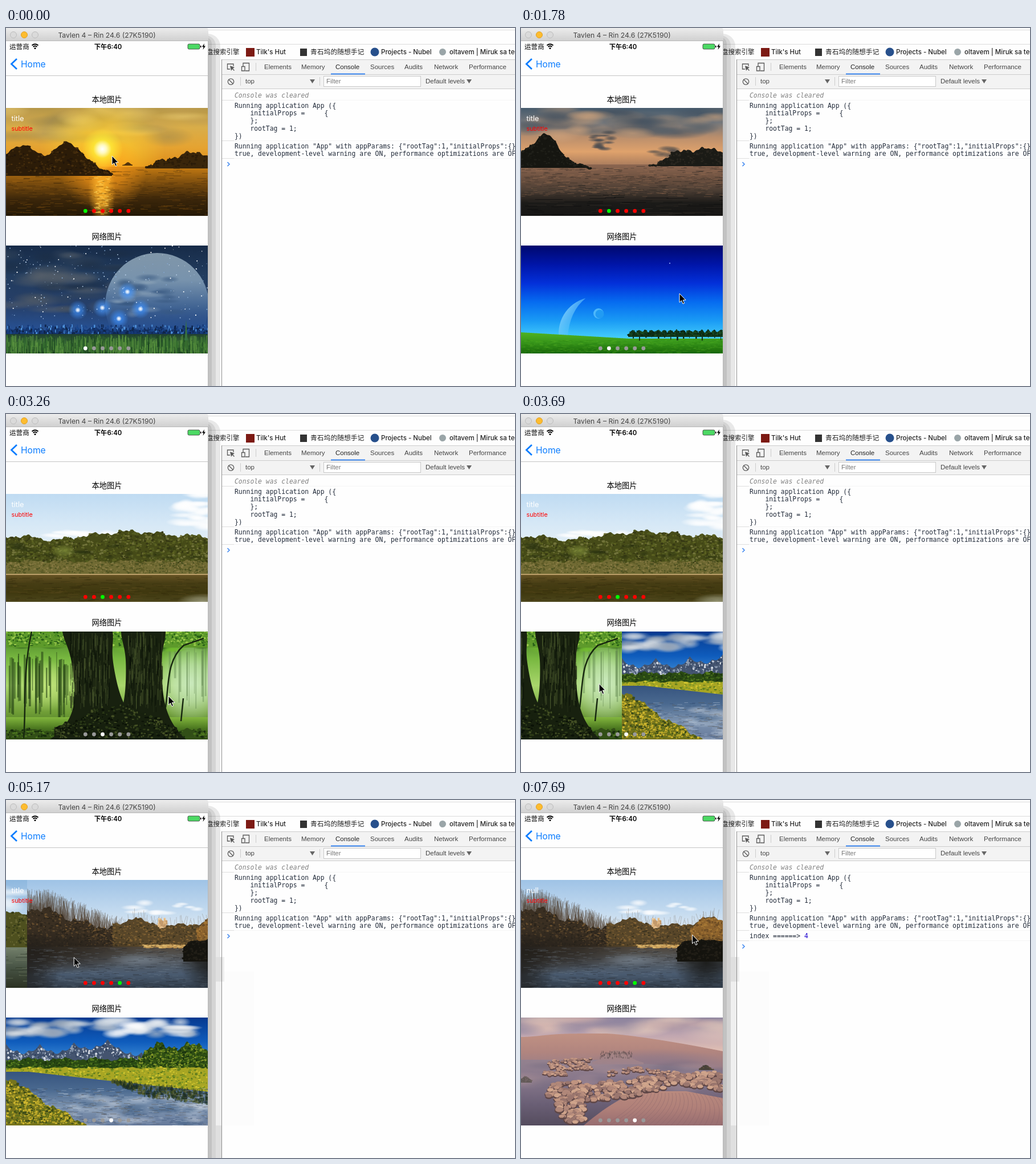
Write an HTML page with a canvas that moves like this. It is 893 px wide and 627 px high and loops after 8000 ms.

```html
<!DOCTYPE html>
<html lang="zh">
<head>
<meta charset="utf-8">
<title>Carousel demo</title>
<style>
html, body { margin: 0; width: 100%; height: 100%; overflow: hidden; background: #fff; }
svg, .carousel { position: absolute; left: 0; top: 0; }
.carousel { width: 354px; height: 189px; overflow: hidden; }
.strip { display: flex; width: 1770px; }
canvas { flex: none; display: block; }
text { white-space: pre; }
.ui { font-family: Inter, "Noto Sans CJK SC", "Noto Sans CJK", sans-serif; }
.tab { font: 11.5px "Liberation Sans", sans-serif; fill: #444; }
.mono { font: 11.38px "DejaVu Sans Mono", monospace; fill: #222b3a; }
.mid { text-anchor: middle; }
</style>
</head>
<body>
<svg width="893" height="627">
  <defs>
    <linearGradient id="bar" x2="0" y2="1"><stop stop-color="#ececec"/><stop offset="1" stop-color="#cfcfcf"/></linearGradient>
  </defs>
  <rect width="893" height="627" fill="#fefefe"/>
  <path d="M354 3.5H893M354 28.5H893" stroke="#dcdcdc"/>

  <g class="ui" font-size="11.5" font-weight="500" fill="#222">
    <text x="352" y="46">盘搜索引擎</text>
    <rect x="421" y="35" width="15" height="15" fill="#7d1a14"/>
    <text x="439" y="46">Tilk's Hut</text>
    <rect x="516" y="36" width="12" height="13" fill="#333"/>
    <text x="534" y="46" font-size="11.8">青石坞的随想手记</text>
    <circle cx="647" cy="42" r="7.5" fill="#27508c"/>
    <text x="658" y="46">Projects - Nubel</text>
    <circle cx="766" cy="42" r="6" fill="#9aa5a8"/>
    <text x="778" y="46">oltavem | Miruk sa te</text>
  </g>

  <rect x="379" y="55" width="514" height="52" fill="#f3f3f3"/>
  <path d="M379 55.5H893M379 81.5H893M379 106.5H893" stroke="#ccc"/>
  <path d="M438.5 61V75M411.5 86V101M550.5 86V101" stroke="#ccc"/>
  <g fill="none" stroke="#5a5a5a" stroke-width="1.3">
    <path d="M393 72H388.5V63H399V67"/>
    <path d="M393 66l2 9 2-3 3 3 1-1-3-3 3-2z" fill="#5a5a5a" stroke="none"/>
    <path d="M416 67V61.5H426.5V75H420M413.5 67.5H419V75H413.5Z"/>
    <circle cx="394.5" cy="94" r="5.2"/><path d="M391 90.5l7 7"/>
  </g>
  <g class="tab">
    <text x="453" y="72">Elements</text><text x="518" y="72">Memory</text>
    <text x="578" y="72" fill="#222">Console</text><text x="639" y="72">Sources</text>
    <text x="699" y="72">Audits</text><text x="751" y="72">Network</text>
    <text x="812" y="72">Performance</text>
    <rect x="557.5" y="84.5" width="170" height="18" fill="#fff" stroke="#c8c8c8"/>
    <text x="420" y="97">top</text><text x="562" y="97" style="fill:#777">Filter</text>
    <text x="736" y="97">Default levels</text>
    <path d="M533 90h9l-4.5 7zM808 90h9l-4.5 7z" fill="#666"/>
  </g>
  <path d="M570 80.5H630" stroke="#3b86f0" stroke-width="2"/>

  <path d="M400 126.5H893M400 197.5H893M400 228.5H893" stroke="#f5f5f5"/>
  <path d="M379 126.5H400M379 197.5H400M379 228.5H400" stroke="#dedede"/>
  <g class="mono">
    <text x="401" y="122" font-style="italic" style="fill:#808080">Console was cleared</text>
    <text x="401" y="140">Running application App ({</text>
    <text x="401" y="153">    initialProps =     {</text>
    <text x="401" y="166">    };</text>
    <text x="401" y="180">    rootTag = 1;</text>
    <text x="401" y="193">})</text>
    <text x="401" y="211">Running application "App" with appParams: {"rootTag":1,"initialProps":{}</text>
    <text x="401" y="224">true, development-level warning are ON, performance optimizations are OF</text>
    <g id="log">
      <path d="M379 246.5H400" stroke="#dedede"/><path d="M400 246.5H893" stroke="#f5f5f5"/>
      <text x="401" y="242">index ======&gt; <tspan fill="#1c00cf">4</tspan></text>
    </g>
  </g>
  <path id="prompt" d="M388.5 235l3.5 3.5-3.5 3.5" fill="none" stroke="#3b86f0" stroke-width="1.5"/>

  <g fill="#000" fill-opacity=".085">
    <rect x="-20" y="10" width="396" height="660" rx="22"/>
    <rect x="-20" y="13" width="388" height="660" rx="18"/>
    <rect x="-20" y="16" width="381" height="660" rx="12"/>
  </g>
  <path d="M378.5 55V627" stroke="#8e8e8e"/>
  <g id="ghost">
    <path d="M383 300H435V570H383z" fill="#fcfcfc"/>
    <path d="M379 275H383V318H379z" fill="#eee"/>
    <path d="M368 275H378V318H368zM368 570H378V627H368z" fill="#dfdfdf"/>
    <path d="M368 318H378V570H368z" fill="#efefef"/>
  </g>

  <path d="M0 22H355V627H0z" fill="#fefefe"/>
  <path d="M0 0H351Q355 0 355 4V23H0z" fill="url(#bar)"/>
  <path d="M0 22.5H355M354.5 22V627" stroke="#b8b8b8"/>
  <g fill="#dadada" stroke="#bdbdbd">
    <circle cx="13" cy="12" r="5.5"/><circle cx="51" cy="12" r="5.5"/>
    <circle cx="32" cy="12" r="5.5" fill="#fdbc2f" stroke="#e0a024"/>
  </g>
  <g class="ui">
    <text class="mid" x="177" y="17" font-size="12.2" fill="#444">Tavlen 4 – Rin 24.6 (27K5190)</text>
    <text x="6" y="36.5" font-size="11.6">运营商</text>
    <text class="mid" x="179" y="36.5" font-size="11.3" font-weight="600">下午6:40</text>
    <text x="26" y="68.5" font-size="15.6" fill="#0a7cff">Home</text>
    <text class="mid" x="177" y="129.5" font-size="13.3">本地图片</text>
    <text class="mid" x="177" y="370" font-size="13.3">网络图片</text>
  </g>
  <g fill="none" stroke="#000" stroke-width="1.8">
    <path d="M45.5 30.5q5.5-4.5 11 0M47.5 33q3.5-3 7 0"/><circle cx="51" cy="35.5" r=".7"/>
  </g>
  <rect x="319" y="28" width="21" height="9" rx="2" fill="#4cd964" stroke="#333" stroke-width=".8"/>
  <path d="M341 31h1.5v3H341zM348 27l-4 6h2.500l-1 5 4.500-6.500h-2.700z"/>
  <path d="M19 54l-9.500 9 9.500 9" fill="none" stroke="#0a7cff" stroke-width="2.8"/>
  <path d="M0 83.5H354" stroke="#c4c4c4"/>
</svg>

<div class="carousel" style="top:140px"><div class="strip" id="local"></div></div>
<div class="carousel" style="top:381px"><div class="strip" id="remote"></div></div>

<svg width="893" height="627">
  <text class="ui" id="caption" x="9.5" y="163" font-size="12.8" fill="#fff">title</text>
  <text class="ui" x="9.5" y="180" font-size="10.8" fill="red">subtitle</text>
  <g id="localDots"></g><g id="remoteDots"></g>
  <path id="cursor" d="M0 0V15.5L3.6 12.3 6 18 8.6 17 6.2 11.4H11Z" stroke="#fff"/>
</svg>

<script>
const $ = id => document.getElementById(id);
const W = 354, H = 189;
let g, seed;

const clamp = u => Math.min(1, Math.max(0, u));
const ramp = (x, a, b) => clamp((x - a) / (b - a));
const bump = (x, center, width) => Math.exp(-(((x - center) / width) ** 2));
const rough = (x, amp) => amp * (Math.sin(x / 9) + .6 * Math.sin(x / 3.7 + 1) + .4 * Math.sin(x / 1.7));
const value = (v, x) => typeof v === 'function' ? v(x) : v;
const rnd = (a, b) => {
  seed = seed * 16807 % 2147483647;
  return a + (b - a) * seed / 2147483647;
};
const pick = list => list[Math.floor(rnd(0, list.length))];
const times = (n, draw) => { for (let i = 0; i < n; i++) draw(i); };

function vertical(y0, y1, colors) {
  const grad = g.createLinearGradient(0, y0, 0, y1);
  colors.forEach((c, i) => grad.addColorStop(i / (colors.length - 1), c));
  return grad;
}
function fade(y0, y1, ...colors) {
  g.fillStyle = vertical(y0, y1, colors);
  g.fillRect(0, y0, W, y1 - y0);
}
function land(color, x0, x1, top, base = H) {
  g.fillStyle = color;
  g.beginPath();
  g.moveTo(x0, base);
  for (let x = x0; x <= x1; x++) g.lineTo(x, value(top, x));
  g.lineTo(x1, base);
  g.fill();
}
function disc(color, x, y, rx, ry = rx) {
  g.fillStyle = color;
  g.beginPath();
  g.ellipse(x, y, rx, ry, 0, 0, 7);
  g.fill();
}
function glow(color, x, y, rx, ry = rx, alpha = 1) {
  g.save();
  g.translate(x, y);
  g.scale(1, ry / rx);
  g.globalAlpha = alpha;
  const grad = g.createRadialGradient(0, 0, 0, 0, 0, rx);
  grad.addColorStop(0, color);
  grad.addColorStop(.45, color + 'b0');
  grad.addColorStop(1, color + '00');
  disc(grad, 0, 0, rx);
  g.restore();
}
function clouds(n, colors, x0, x1, y0, y1, size, alpha) {
  times(n, () => glow(pick(colors), rnd(x0, x1), rnd(y0, y1), rnd(.4, 1) * size, rnd(.12, .28) * size, alpha));
}
function bars(n, colors, x0, x1, y0, y1, w, h) {
  times(n, () => {
    g.fillStyle = pick(colors);
    g.fillRect(rnd(x0, x1), rnd(y0, y1), rnd(.3, 1) * w, rnd(.5, 1) * h);
  });
}
// Speckled foliage between a skyline and a base line.
function mass(n, colors, x0, x1, top, base, r) {
  land(colors[0], x0, x1, top, base);
  times(n, () => {
    const x = rnd(x0, x1), y = value(top, x);
    disc(pick(colors), x, rnd(y, Math.max(y, base - r)), rnd(.3, 1) * r, rnd(.25, .7) * r);
  });
}
function twigs(n, color, x0, x1, top, base) {
  g.strokeStyle = color;
  g.lineWidth = .5;
  g.beginPath();
  times(n, () => {
    const x = rnd(x0, x1), y = value(top, x) + rnd(-5, 30);
    g.moveTo(x, base);
    g.quadraticCurveTo(x + rnd(-3, 3), (y + base) / 2, x + rnd(-9, 9), y);
  });
  g.stroke();
}
function stones(n, x0, x1, top, depth, r) {
  times(n, i => {
    const x = rnd(x0, x1), y = top(x) + value(depth, x) * i / n, w = rnd(.6, 1) * r;
    disc('#5f4747', x, y + 1.5, w, w * .65);
    disc(pick(['#d0a58c', '#c09480', '#b1887a', '#9a766e']), x, y, w * .85, w * .5);
  });
}
function trunk(center, lean, half, flare) {
  const edge = (y, side) => center + lean * y / H + side * (half + 8 * bump(y, 0, 30) + flare * (y / H) ** 5);
  g.fillStyle = '#18210f';
  g.beginPath();
  for (let y = 0; y <= H; y++) g.lineTo(edge(y, -1), y);
  for (let y = H; y >= 0; y--) g.lineTo(edge(y, 1), y);
  g.fill();
  bars(220, ['#39452488', '#0b1208aa', '#4d5c3088'], center - half + 4, center + half + 2, 0, 115, 2, 30);
}

const localPhotos = [
  function sunset() {
    fade(0, 104, '#b49648', '#d9ad49', '#e5a331', '#dd8a17');
    clouds(30, ['#9a864d', '#eed077', '#c4a052'], 0, W, 0, 55, 70, .5);
    glow('#ffd02c', 169, 72, 110, 85, .8);
    fade(103, H, '#c77c12', '#7a4c0e', '#3b260a', '#241806');
    glow('#ff9c18', 172, 115, 75, 65, .8);
    glow('#ffb52c', 168, 145, 24, 60, .9);
    bars(500, ['#2d1c0877', '#a96a1666'], 0, W, 106, H, 18, 1);
    bars(120, ['#ffd65a', '#ffb42d'], 154, 180, 106, 186, 9, 1);
    glow('#fff43a', 169, 72, 36);
    glow('#ffffff', 169, 72, 16);
    mass(350, ['#2c1c08', '#3b270c', '#21150a', '#4a300e'], 0, 186,
      x => 112 - 46 * bump(x, 25, 42) - 50 * bump(x, 110, 38) + rough(x, 2), 119, 3);
    mass(160, ['#3a260b', '#2b1c09'], 246, W, x => 103 - 23 * ramp(x, 246, 310) + rough(x, 3), 106, 3);
    land('#54350d', 204, 222, x => 100 - 5 * bump(x, 214, 5), 101);
  },
  function dusk() {
    fade(0, 102, '#465b6d', '#74777b', '#b98e6c', '#dfa26c', '#a77a5c');
    clouds(40, ['#3e4d5d', '#59626a', '#d4a67d'], 0, W, 0, 50, 60, .6);
    clouds(14, ['#46494e'], 125, 158, 42, 72, 18, .8);
    clouds(6, ['#55504d'], 230, 270, 70, 85, 26, .8);
    fade(99, H, '#8c6650', '#6e5241', '#4c3e34', '#1b1a18', '#171615');
    bars(600, ['#a7795866', '#2e282399'], 0, W, 102, 155, 15, 1);
    bars(90, ['#2c2824', '#0f0f0f'], 0, W, 150, H, 50, 1);
    mass(260, ['#161611', '#20201a'], 0, 122,
      x => 103 - 55 * bump(x, 45, 32) - 20 * bump(x, 0, 25) + rough(x, 2), 105, 3);
    mass(200, ['#1b1b16', '#29261f'], 226, W, x => 101 - 28 * ramp(x, 226, 285) + rough(x, 3), 102, 3);
  },
  function greenLake() {
    const skyline = x => 74 + 7 * bump(x, 85, 35) - 8 * bump(x, 220, 65) + rough(x, 2.4);
    fade(0, 95, '#bfdbf2', '#d4e7f6', '#e6f0f6');
    clouds(26, ['#ffffff'], 305, 365, 0, 60, 34, .8);
    clouds(16, ['#ffffff'], 60, 235, 66, 76, 26, .9);
    mass(1700, ['#464b18', '#5c6222', '#373a14', '#71733a', '#525a20'], 0, W, skyline, 140, 3.2);
    clouds(22, ['#28300f'], 0, W, 85, 112, 20, .6);
    glow('#81903b', 101, 100, 22, 12, .7);
    mass(900, ['#716b34', '#5c5a26', '#887b45', '#4e5222'], 0, W, x => 118 + rough(x, 2), 141, 2.5);
    fade(140, H, '#6b5626', '#463d14', '#3f380f', '#4b451b');
    bars(1, ['#c9ab75'], 0, 0, 140, 140, 2000, 2.5);
    bars(260, ['#5d4d1e66', '#302a0b66'], 0, W, 145, H, 20, 1.5);
    glow('#a2a385', 345, 188, 45, 14, .8);
  },
  function valley() {
    fade(0, 105, '#8eb8df', '#dbe8f2');
    clouds(12, ['#ffffff'], 0, W, 10, 65, 60, .6);
    mass(900, ['#4e501f', '#696833', '#353a17'], 0, W, x => 58 + 25 * bump(x, 160, 70) + rough(x, 2), 120, 3);
    fade(118, H, '#73806b', '#475344', '#2b3122');
    bars(180, ['#8e997a77', '#29312388'], 0, W, 120, H, 30, 1.3);
  },
  function autumnLake() {
    const grove = x => 20 + 52 * ramp(x, 30, 165);
    const farTrees = x => 79 - 14 * bump(x, 190, 18) - 13 * bump(x, 335, 28) + rough(x, 2);
    fade(0, 110, '#9fc3e6', '#c3daef', '#eef1f3');
    clouds(12, ['#ffffff'], 170, 300, 40, 62, 24, .8);
    twigs(800, '#4a3b2a99', 0, 160, grove, 112);
    mass(800, ['#3a2f22', '#4b3b28', '#29231a', '#6b5130', '#2f281e'], 0, 165, x => grove(x) + 30 - 14 * ramp(x, 90, 165) + rough(x, 4), 120, 2.6);
    twigs(160, '#66533c88', 155, W, x => farTrees(x) - 12, 112);
    mass(700, ['#584629', '#70572f', '#3f3520', '#856435'], 150, W, farTrees, 118, 2.6);
    bars(24, ['#dfb681', '#c39a6c', '#edca9b'], 229, 242, 66, 78, 6, 9);
    mass(260, ['#8c622d', '#a47735', '#6c4c25'], 298, W, x => 68 + 14 * (1 - ramp(x, 298, 320)) + rough(x, 2), 109, 3);
    fade(117, H, '#4f463b', '#555a60', '#4a5b70', '#323d4a');
    glow('#26211b', 20, 125, 190, 42, .95);
    glow('#1e1c19', 0, 160, 60, 70, .8);
    glow('#8594a3', 195, 140, 55, 12, .5);
    bars(600, ['#7d8b9955', '#25282c77'], 0, W, 119, H, 15, 1);
    bars(120, ['#bd9251', '#dab66d'], 202, 277, 113, 118, 10, 2);
    glow('#171715', 325, 145, 58, 50, .9);
    mass(260, ['#15140f', '#211e17'], 274, W, x => 106 + 14 * bump(x, 272, 9) + rough(x, 1), 143, 3);
  },
];

const remotePhotos = [
  function nightPlanet() {
    fade(0, 156, '#172b48', '#223c5e', '#263f69', '#27549b');
    clouds(38, ['#59616a', '#35465a', '#1b2c42'], 0, 220, 10, 115, 55, .55);
    disc(vertical(13, 155, ['#8096a9', '#7893ad', '#416493', '#27519700']), 265, 104, 91);
    clouds(16, ['#37577f'], 205, 300, 55, 120, 30, .6);
    clouds(10, ['#b3c3cc'], 190, 260, 60, 120, 28, .3);
    times(260, () => disc(pick(['#ffffff', '#b8cfea', '#86aad5']), rnd(0, W), rnd(0, 130), rnd(.3, 1.1)));
    for (const [x, y] of [[126, 113], [169, 109], [213, 81], [236, 111], [198, 128]]) {
      glow('#3f93ff', x, y, 17, 17, .8);
      glow('#ffffff', x, y, 5);
    }
    mass(300, ['#14346c', '#1c4689', '#102447'], 0, W, x => 146 + rough(x, 2), 157, 3);
    bars(330, ['#4d8fd8', '#1a478d', '#10264d', '#173a78'], 0, W, 138, 152, 3, 6);
    fade(155, H, '#203f31', '#386934', '#244c23');
    times(900, () => {
      const x = rnd(0, W);
      land(pick(['#316a2d99', '#4d863999', '#1c442299', '#619a4499']), x, x + 2, rnd(156, 180), rnd(176, 195));
    });
    land('#377141', 313, 319, x => 166 - 36 * bump(x, 316, 1.5), 166);
  },
  function blueMeadow() {
    const meadow = x => 152 + 11 * ramp(x, 0, 190);
    fade(0, 165, '#00086d', '#0015a8', '#0330d9', '#066cf0', '#1a9bf5', '#49d2fc');
    const ring = g.createLinearGradient(70, 105, 125, 140);
    ring.addColorStop(0, '#8ad4fd');
    ring.addColorStop(1, '#42baf700');
    g.fillStyle = ring;
    g.beginPath();
    g.arc(130, 154, 64, 2.8, 4.45);
    g.quadraticCurveTo(85, 115, 82, 160);
    g.fill();
    disc('#4db8fb', 136, 119, 9);
    disc('#219bf3', 138, 120, 7.5);
    disc('#9bbcff', 261, 31, 1);
    land(vertical(152, H, ['#4fb322', '#37951a', '#176508']), 0, W, meadow);
    bars(700, ['#61bb2855', '#23750c55'], 0, W, 165, H, 9, 1);
    for (let x = 196; x < W + 6; x += 11) {
      bars(1, ['#112c16'], x, x, 152, 152, 3, 15);
      mass(35, ['#10351b', '#1c4c23', '#0b2715'], x - 8, x + 8, u => 157 - 9 * bump(u, x, 6), 160, 2.5);
    }
  },
  function forest() {
    fade(0, H, '#437b23', '#78b840', '#a9d66c', '#6f9d36', '#315f19');
    glow('#cdebc5', 325, 90, 65, 75, .9);
    glow('#c6e77c', 70, 95, 55, 45, .7);
    bars(45, ['#213d1399', '#34571d99'], 0, 115, 35, 65, 4, 100);
    bars(13, ['#5a814a66'], 285, W, 15, 40, 4, 105);
    clouds(50, ['#72bc2e', '#356d19', '#1c4913'], 0, W, 0, 32, 35, .8);
    mass(900, ['#5e9a2b', '#4b8c22', '#9ac94b', '#285f18'], 0, W, 0, 28, 3);
    fade(150, H, '#82b63d', '#4c7820', '#203d10');
    mass(400, ['#324f17', '#182e0d', '#4c761f'], 0, W, x => 172 + rough(x, 2), H, 3);
    trunk(143, 30, 36, 60);
    trunk(241, 2, 31, 42);
    mass(550, ['#17200e', '#2b3917', '#0b1207', '#434f24'], 85, 300, x => 178 - 50 * bump(x, 195, 85) + rough(x, 2), H, 3);
    g.strokeStyle = '#17280f';
    g.lineWidth = 2.5;
    g.stroke(new Path2D('M280 133C286 90 282 50 312 24L347 12M307 157L311 117M31 187C36 120 28 80 45 0'));
  },
  function mountains() {
    const peaks = x => 46 + 13 * Math.abs(Math.sin(x / 19)) + 5 * Math.abs(Math.sin(x / 6.3))
      - 9 * bump(x, 165, 42) + 18 * ramp(x, 205, 245);
    const bank = x => 95 + 35 * ramp(x, 40, W);
    fade(0, 85, '#06398f', '#0f5cbc', '#4b9ade');
    clouds(28, ['#cdd5dc', '#8f9fb4', '#e9ecee'], 0, 130, 6, 30, 40, .7);
    clouds(34, ['#ffffff', '#dfe5ea', '#a8b6c6'], 165, 330, 4, 30, 38, .75);
    land('#44546f', 0, 245, peaks, 85);
    times(420, () => {
      const x = rnd(0, 235);
      disc(pick(['#d5dbe3', '#8c9bb1', '#2f405c', '#4f617d', '#394b68']), x, peaks(x) + rnd(1, 20), rnd(.6, 2.2), rnd(.6, 2.5));
    });
    mass(700, ['#294913', '#3f651a', '#597f20', '#1d350f'], 0, W, x => 73 + rough(x, 2), 97, 2.6);
    mass(700, ['#2f4e14', '#58791c', '#1b350f', '#81942a'], 232, W, x => 50 + 14 * bump(x, 232, 15) + rough(x, 5), 95, 2.8);
    mass(1000, ['#a8a624', '#d0c52f', '#829925', '#617d1e'], 0, W, x => 88 + rough(x, 1), 134, 2.8);
    land(vertical(95, H, ['#36547f', '#4a698f', '#7e94b0', '#65799a']), 0, W, bank);
    clouds(34, ['#d4dae2', '#b7c5d6', '#38587e'], 110, W, 135, H, 36, .5);
    mass(350, ['#273a1d', '#3e4f22', '#1c2d26', '#53602a'], 180, W, bank, x => 0, 0);
    times(420, () => {
      const x = rnd(185, W);
      disc(pick(['#273a1d99', '#5a612a99', '#1c2d2699']), x, bank(x) + rnd(0, 20) * ramp(x, 185, 250), rnd(1, 3), rnd(1, 5));
    });
    bars(600, ['#b5c3d488', '#2d466b88', '#5b514588'], 25, W, 124, H, 12, 1);
    mass(1100, ['#77751d', '#b4a428', '#606e1b', '#d0b72f', '#3c4a17'], 0, 142, x => 107 + 82 * ramp(x, 15, 142) ** .8 + rough(x, 3), H, 3);
  },
  function desert() {
    const wall = x => 113 - 17 * ramp(x, 150, 290) + rough(x, 1.2);
    fade(0, 62, '#8b829d', '#c0a6b0', '#e4c2b4');
    clouds(22, ['#ecd0bd', '#8d839d', '#d8b4ac'], 0, W, 0, 26, 75, .5);
    land(vertical(28, 92, ['#c09183', '#b1857f', '#957c88']), 0, W, x => 28 + 6 * bump(x, 0, 50) + 31 * ramp(x, 150, W) ** 1.3);
    glow('#84748a', 235, 78, 120, 24, .6);
    land(vertical(72, H, ['#94828f', '#87778b', '#6b6076', '#554c5e']), 0, W, x => 74 + 18 * ramp(x, 130, W));
    clouds(24, ['#726a7f', '#ab9096'], 0, W, 80, 135, 55, .4);
    land(vertical(55, 82, ['#a9857f', '#9d838c']), 125, 215, x => 80 - 23 * bump(x, 168, 28), 82);
    bars(90, ['#564a4b88'], 138, 195, 58, 70, 2, 4);
    land(vertical(128, H, ['#b98a7e', '#b08079', '#976d70']), 110, W, x => 129 + 60 * ramp(x, 215, 110) ** 1.5 + 12 * ramp(x, 290, W));
    g.strokeStyle = '#85636a66';
    times(24, i => {
      g.beginPath();
      g.moveTo(140 + i * 10, 192);
      g.quadraticCurveTo(200 + i * 8, 158, 211 + i * 6, 132);
      g.stroke();
    });
    stones(130, 48, 125, x => 75 - 5 * ramp(x, 48, 125), 20, 4);
    stones(50, 38, 80, () => 94, 7, 4);
    stones(75, 153, 280, x => 95 - 9 * bump(x, 205, 40), 9, 4);
    stones(330, 48, W, wall, x => 32 - 12 * bump(x, 270, 55), 8);
    stones(100, 62, 112, x => 126 - ramp(x, 62, 112), x => 35 + 23 * ramp(x, 60, 80), 9);
    mass(40, ['#48423a', '#61533e'], 312, 338, x => 92 - 9 * bump(x, 324, 9), 92, 2);
    mass(30, ['#625957', '#746665'], 0, 19, x => 111 - 8 * bump(x, 8, 8), 114, 2);
  },
];

function fillStrip(id, photos) {
  photos.forEach((draw, i) => {
    const canvas = document.createElement('canvas');
    canvas.width = W;
    canvas.height = H;
    g = canvas.getContext('2d');
    seed = 4321 + i * 977;
    draw();
    $(id).append(canvas);
  });
}
function addDots(id, y) {
  times(6, i => {
    const dot = document.createElementNS('http://www.w3.org/2000/svg', 'circle');
    dot.setAttribute('cx', 139.3 + i * 15.1);
    dot.setAttribute('cy', y);
    dot.setAttribute('r', 3.4);
    $(id).append(dot);
  });
}
fillStrip('local', localPhotos);
fillStrip('remote', remotePhotos);
addDots('localDots', 320.4);
addDots('remoteDots', 561);

// The picture advances in ticks; every swipe eases over four of them.
const LOOP = 8000, TICK = 148, LEAD = 13, SWIPE = 4;
const swipes = { local: [0, 14, 30, 32], remote: [7, 18, 23, 35] };
const stops = [
  [0, 186, 224], [3, 85, 230], [6, 111, 469], [7, 111, 469], [8, 77, 471], [12, 278, 465],
  [15, 215, 236], [18, 100, 240], [22, 285, 494], [26, 120, 470], [30, 228, 273],
  [34, 110, 262], [39, 269.5, 496], [47, 269.5, 496], [52, 300.5, 236],
];
const ease = u => u ** 3 * (10 - 15 * u + 6 * u * u);

function cursorAt(tick) {
  const next = stops.findIndex(s => s[0] > tick);
  if (next < 0) return stops.at(-1).slice(1);
  const [t0, x0, y0] = stops[next - 1], [t1, x1, y1] = stops[next];
  const u = ease(ramp(tick, t0, t1));
  return [x0 + (x1 - x0) * u, y0 + (y1 - y0) * u];
}
function setPage(name, tick, on, off) {
  const page = swipes[name].reduce((sum, s) => sum + ease(ramp(tick, s, s + SWIPE)), 0);
  $(name).style.transform = `translateX(${-Math.round(page * W)}px)`;
  [...$(name + 'Dots').children].forEach((dot, i) => dot.setAttribute('fill', i === Math.round(page) ? on : off));
}

function render(now) {
  const tick = Math.floor((now % LOOP + LEAD) / TICK);
  const logged = tick >= 43;
  setPage('local', tick, '#0f0', '#f00');
  setPage('remote', tick, '#fff', '#999');
  $('cursor').setAttribute('transform', `translate(${cursorAt(tick)})`);
  $('caption').textContent = logged ? 'null' : 'title';
  $('log').style.display = logged ? '' : 'none';
  $('prompt').setAttribute('transform', `translate(0 ${logged ? 18 : 0})`);
  $('ghost').style.display = tick >= 28 ? '' : 'none';
}

let start;
function loop(now) {
  start ??= now;
  render(now - start);
  requestAnimationFrame(loop);
}
render(0);
requestAnimationFrame(loop);
</script>
</body>
</html>
```
